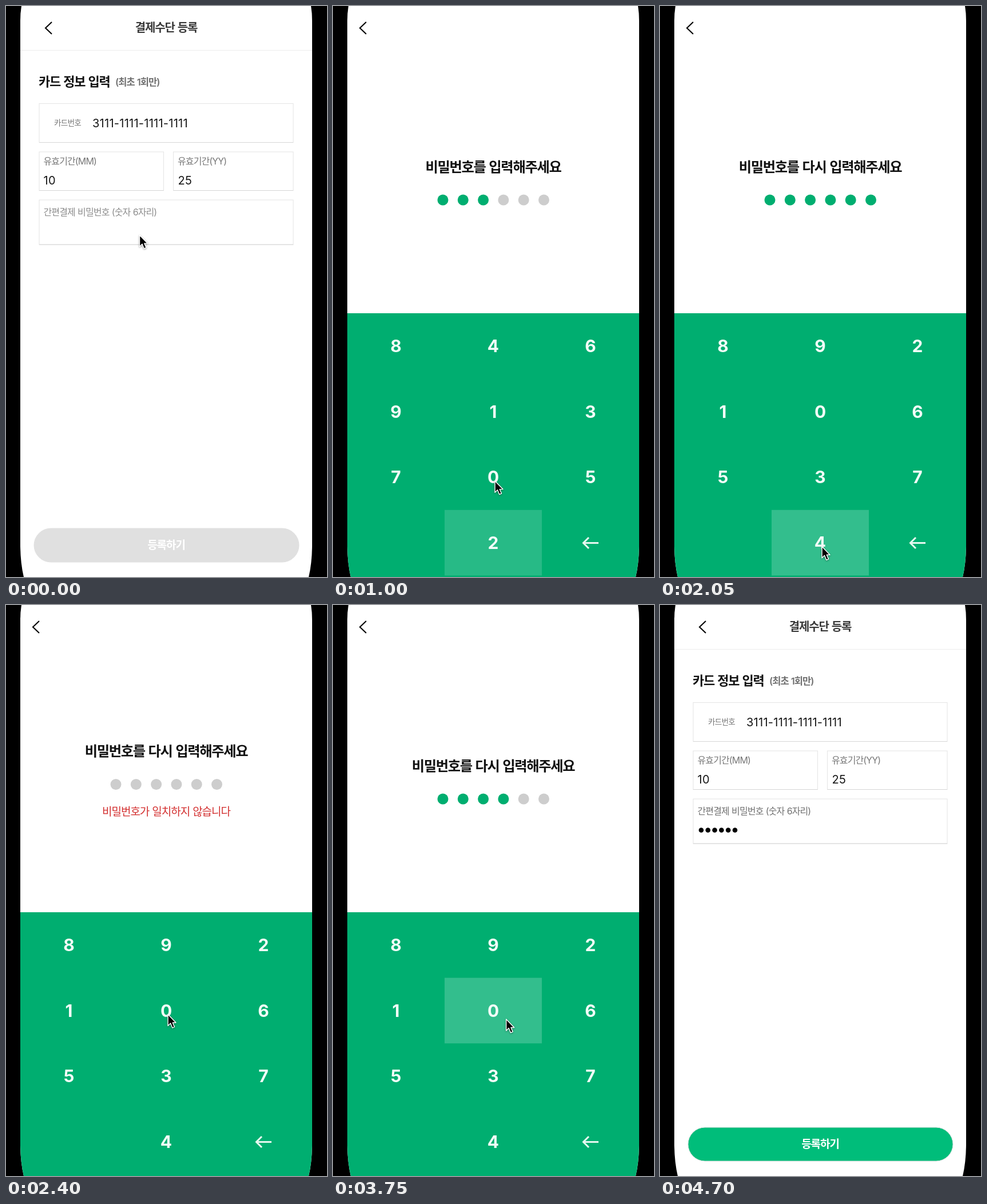
Animation of 561x998 px, one loop 4840 ms. Source, as an HTML page:

```html
<!DOCTYPE html>
<html lang="ko">
<head>
<meta charset="utf-8">
<style>
  html, body { margin: 0; height: 100%; overflow: hidden; background: #000; }
  svg { display: block; width: 561px; height: 998px; }
  text { font-family: Inter, "Noto Sans CJK KR", "Noto Sans CJK", sans-serif; letter-spacing: -.055em; word-spacing: .04em; }
  .mid { text-anchor: middle; }
  .bold { font-weight: 600; }
  .label { font-size: 16px; fill: #777; }
  .value { font-size: 20px; fill: #151515; letter-spacing: .013em; }
  .title { font-size: 24.3px; fill: #111; }
  .key { font-size: 30px; font-weight: 700; fill: #f3fcf8; letter-spacing: 0; }
  .line { fill: none; stroke: #000; stroke-width: 2.1; }
  .field rect { fill: #fff; stroke: #e4e4e4; }
  .field path { stroke: #d6d6d6; }
  #cursor { filter: drop-shadow(0 1.5px 1.5px #0006); }
</style>
</head>
<body>
<svg viewBox="0 0 561 998">
  <clipPath id="phone">
    <path d="M27 0Q25 12 25 26V945Q25.5 975 31 998H529Q534.5 975 535 945V26Q535 12 533 0Z"/>
  </clipPath>
  <g clip-path="url(#phone)">
    <rect width="561" height="998" fill="#fff"/>
    <g id="form">
      <path class="line" d="M80 28L69 38.5L80 49"/>
      <text class="mid bold" x="280" y="45" font-size="20" fill="#3a3a3a">결제수단 등록</text>
      <path d="M25 77.5H535" stroke="#ececec"/>
      <text class="bold" x="57" y="140" font-size="22" fill="#111">카드 정보 입력</text>
      <text class="bold" x="191" y="138.5" font-size="16.5" fill="#707070">(최초 1회만)</text>
      <g id="fields" class="field"></g>
      <text x="84" y="209" font-size="13.6" fill="#777">카드번호</text>
      <text class="value" x="151" y="212">3111-1111-1111-1111</text>
      <text class="label" x="65.5" y="277">유효기간(MM)</text>
      <text class="value" x="65.5" y="312">10</text>
      <text class="label" x="300" y="277">유효기간(YY)</text>
      <text class="value" x="300.5" y="312">25</text>
      <text class="label" id="pinLabel" x="65.5" y="366">간편결제 비밀번호 (숫자 6자리)</text>
      <g id="pinMask"></g>
      <rect id="button" x="49" y="913" width="463" height="59" rx="29.5" stroke="#e0e0e0"/>
      <text class="mid bold" x="280" y="949" font-size="19" fill="#fff">등록하기</text>
    </g>
    <g id="pad">
      <path class="line" d="M58 28L47 38.5L58 49"/>
      <g id="prompt">
        <text class="title mid bold" id="title" x="280" y="289.5"></text>
        <g id="dots"></g>
      </g>
      <text class="mid" id="error" x="280" y="368" font-size="19" fill="#d32f2f">비밀번호가 일치하지 않습니다</text>
      <rect y="537" width="561" height="461" fill="#00ae70"/>
      <g id="keys"></g>
      <path d="M464 938.5H437.5M447 929L437.5 938.5L447 948" fill="none" stroke="#e6f7f0" stroke-width="3"/>
    </g>
  </g>
  <path id="cursor" d="M0 0V20L4.5 15.5L7.8 23.5L11.5 21.8L8.3 14.4H14Z" stroke="#fff" stroke-width="1.4" stroke-linejoin="round"/>
</svg>
<script>
const LOOP = 4840, STEP = 50;
const PAD_OPEN = 150, PAD_CLOSE = 4000, ERROR_ON = 2250, CURSOR_OFF = 4550;
const CELL_W = 170, CELL_H = 114.6, PAD_X = 25, PAD_Y = 537;

const stages = [
  { from: 0, title: '비밀번호를 입력해주세요', layout: '846913705 2',
    code: '202032', times: [400, 600, 850, 1050, 1300, 1700] },
  { from: 1750, title: '비밀번호를 다시 입력해주세요', layout: '892106537 4',
    code: '444444', times: Array.from({ length: 6 }, (_, i) => 1800 + 50 * i) },
  { from: ERROR_ON, title: '비밀번호를 다시 입력해주세요', layout: '892106537 4',
    code: '202032', times: [2550, 2800, 3050, 3700, 3850, 3950] },
];
const ERROR_OFF = stages[2].times[0];
const presses = stages.flatMap(s => s.times.map((time, i) => ({ time, cell: s.layout.indexOf(s.code[i]) })));

const $ = id => document.getElementById(id);
function add(parent, tag, attrs) {
  const el = document.createElementNS('http://www.w3.org/2000/svg', tag);
  for (const name in attrs) el.setAttribute(name, attrs[name]);
  return parent.appendChild(el);
}
const show = (el, on) => el.style.display = on ? '' : 'none';
const clamp = v => Math.max(0, Math.min(1, v));
const cellX = cell => PAD_X + cell % 3 * CELL_W;
const cellY = cell => PAD_Y + Math.floor(cell / 3) * CELL_H;

function addField(x, y, width, height) {
  add($('fields'), 'rect', { x, y, width, height });
  add($('fields'), 'path', { d: `M${x} ${y + height}h${width}` });
}
addField(58, 170.5, 444, 68);
addField(58, 255, 217.5, 67.5);
addField(292.5, 255, 209.5, 67.5);
addField(58, 339, 444, 78);

const dots = [];
for (let i = 0; i < 6; i++) {
  add($('pinMask'), 'circle', { cx: 72 + 11.8 * i, cy: 393.5, r: 4.3 });
  dots.push(add($('dots'), 'circle', { cx: 192 + 35.3 * i, cy: 339, r: 9.5 }));
}
const keys = Array.from({ length: 11 }, (_, i) => ({
  glow: add($('keys'), 'rect', { x: cellX(i), y: cellY(i), width: CELL_W, height: CELL_H, fill: '#fff' }),
  label: add($('keys'), 'text', { x: cellX(i) + CELL_W / 2, y: cellY(i) + 68, class: 'key mid' }),
}));

// The cursor visits each pressed key, stopping a little short of its centre;
// it also pauses over the middle key while the error is showing.
const visits = [...presses, { time: 2430, cell: 4 }].sort((a, b) => a.time - b.time);
const stops = [{ time: 50, x: 233.5, y: 400.5 }];
visits.forEach(({ time, cell }, i) => {
  const from = i ? visits[i - 1].cell : cell;
  stops.push({ time, x: cellX(cell) + 88 + .2 * (cellX(from) - cellX(cell)), y: cellY(cell) + 64 });
});

function cursorAt(t) {
  const i = stops.findIndex(s => s.time > t);
  if (i === 0) return [stops[0].x, stops[0].y];
  if (i < 0) return [stops.at(-1).x, stops.at(-1).y];
  const a = stops[i - 1], b = stops[i], rest = Math.min(50, (b.time - a.time) / 4);
  const u = clamp((t - a.time - rest) / (b.time - a.time - 2 * rest));
  const easeX = 1 - (1 - u) ** 3, easeY = u * u * (3 - 2 * u);
  return [a.x + (b.x - a.x) * easeX, a.y + (b.y - a.y) * easeY];
}

function glowAt(t, cell) {
  const last = presses.findLast(p => p.cell === cell && p.time <= t);
  return last ? .2 * clamp((250 - t + last.time) / 130) : 0;
}

function draw(t) {
  const done = t >= PAD_CLOSE, padOpen = t >= PAD_OPEN && !done;
  show($('form'), !padOpen);
  show($('pad'), padOpen);
  show($('pinMask'), done);
  $('pinLabel').style.fill = done ? '#707070' : '#8c8c8c';
  $('button').setAttribute('fill', done ? '#00bd7a' : '#e0e0e0');

  const stage = stages.findLast(s => s.from <= t);
  const count = stage.times.filter(time => time <= t).length;
  const failed = t >= ERROR_ON && t < ERROR_OFF;
  $('title').textContent = stage.title;
  $('prompt').setAttribute('transform', `translate(0 ${failed ? -25.5 : 0})`);
  show($('error'), failed);
  dots.forEach((dot, i) => dot.setAttribute('fill', i < count ? '#00ae70' : '#cdcdcd'));
  keys.forEach((key, i) => {
    key.label.textContent = stage.layout[i];
    key.glow.setAttribute('opacity', glowAt(t, i));
  });

  show($('cursor'), t < CURSOR_OFF);
  $('cursor').setAttribute('transform', `translate(${cursorAt(t)})`);
}

let start;
function tick(now) {
  start ??= now;
  draw(Math.floor((now - start) % LOOP / STEP) * STEP);
  requestAnimationFrame(tick);
}
draw(0);
requestAnimationFrame(tick);
</script>
</body>
</html>
```
